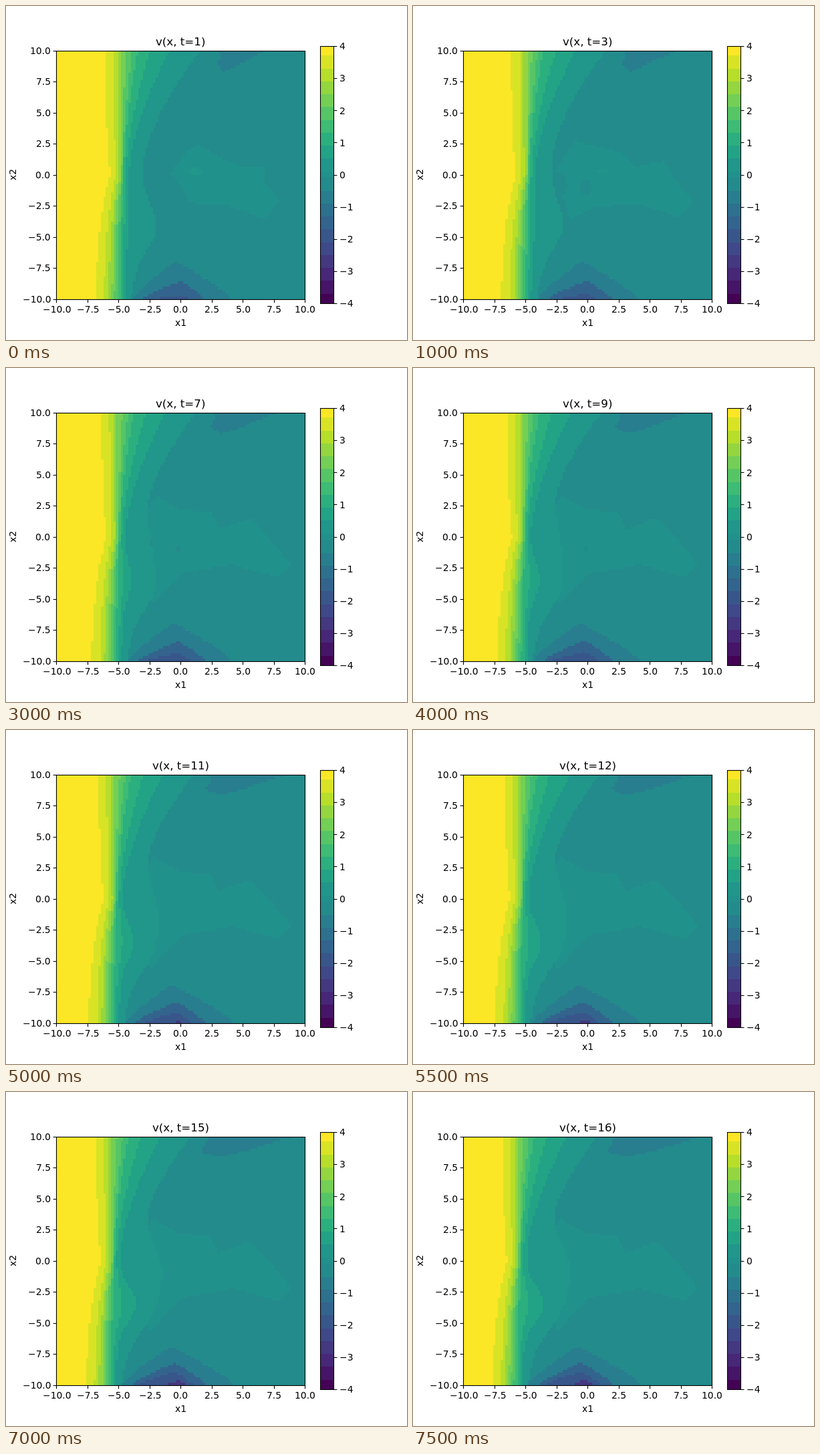
These frames come from a looping animation (600 by 500 pixels, 8 s). An HTML page with a canvas:

```html
<!DOCTYPE html>
<html lang="en">
<head>
<meta charset="utf-8">
<title>v(x, t)</title>
<style>
html, body { margin: 0; width: 100%; height: 100%; overflow: hidden; background: #fff; }
canvas { display: block; }
</style>
</head>
<body>
<canvas id="c" width="600" height="500"></canvas>
<script>
const ctx = document.getElementById('c').getContext('2d');
const LOOP = 8000, STEP = 500, STEPS = 16;
const L = 75, T = 66.5, SIZE = 372, N = 100, CELL = SIZE / N;
const BAR_Y = 60, BAR_H = 385;
const FONT = '"DejaVu Sans", Verdana, sans-serif';

const lerp = (a, b, k) => a + (b - a) * k;
const mix = (a, b, k) => a.map((v, i) => lerp(v, b[i], k));
const bump = (u, c, w) => Math.exp(-(((u - c) / w) ** 2));

const VIRIDIS = ['440154', '482475', '414487', '355f8d', '2a788e', '21918c',
  '22a884', '44bf70', '7ad151', 'bddf26', 'fde725']
  .map(h => [0, 2, 4].map(i => parseInt(h.slice(i, i + 2), 16)));

function viridis(p) {
  const s = Math.max(0, Math.min(.9999, p)) * 10, i = Math.floor(s);
  return `rgb(${mix(VIRIDIS[i], VIRIDIS[i + 1], s - i).map(Math.round)})`;
}

// bands are 0.4 wide, with a narrow one around zero
const bandOf = v => Math.sign(v) * Math.min(10, Math.floor((Math.abs(v) + .3) / .4));
const bandColor = n => viridis(.5 + Math.sign(n) * Math.max(0, .42 * Math.abs(n) - .23) / 8);
const colorOf = v => bandColor(bandOf(v));

// left slope at height u (-1 top, 1 bottom) and progress k: [x, value] knots
function slope(u, k) {
  const shift = -15 * k, up = u < 0 ? (-u) ** 1.6 : 0, down = Math.max(0, u);
  const full = shift + (u < 0 ? 148 + 8 * Math.exp(2.4 * u) : 131 + 25 * Math.exp(-u / .45));
  const steep = shift + 157 + 15 * Math.exp(-down / .4);
  return [
    [full, 3.7],
    [lerp(full, steep, .65), 3.2],
    [steep, 2.5],
    [shift + 177 + 24 * up - 5 * down, 1.1],
    [shift + 184 + 61 * up - 5 * down + 28 * k * bump(u, .35, .2), .5],
    [shift + 203 + 87 * up - 16 * down ** 2 + 25 * bump(u, .42, .24)
      + 45 * k * bump(u, .05, .3), .1]
  ];
}

function valueOn(knots, x) {
  if (x < knots[0][0]) return 4;
  for (let i = 1; i < knots.length; i++) {
    const [ax, av] = knots[i - 1], [bx, bv] = knots[i];
    if (x < bx) return lerp(av, bv, (x - ax) / (bx - ax));
  }
  return -.2;
}

// outlines as x, y key points: first and last shape
const PLATEAU = [
  [247,250, 270,216, 288,207, 322,228, 352,240, 387,240, 388,264, 410,292, 386,319, 330,297, 276,295, 260,268],
  [185,245, 220,190, 262,213, 305,214, 318,241, 365,224, 391,250, 427,293, 408,313, 340,294, 262,308, 215,360]
];
const CORNER = [
  [318,66, 321,78, 316,86, 325,100, 350,87, 388,66],
  [302,66, 297,80, 290,90, 318,97, 365,87, 434,66]
];

// nested hills on the lower edge: value, then [centre, left, right, height] at both ends
const HILLS = [
  [-.6, [254, 64, 82, 57], [246, 74, 96, 58]],
  [-1.4, [262, 59, 36, 27], [252, 65, 47, 34]],
  [-2, [262, 47, 15, 6], [253, 57, 27, 21]],
  [-2.8, [262, 14, 12, -9], [256, 16, 16, 9]]
];

function inside(p, x, y) {
  let hit = false;
  for (let i = 0, j = p.length - 2; i < p.length; j = i, i += 2)
    if (p[i + 1] > y !== p[j + 1] > y &&
      x < p[i] + (p[j] - p[i]) * (y - p[i + 1]) / (p[j + 1] - p[i + 1])) hit = !hit;
  return hit;
}

const inSpot = (x, y, cx, cy, rx, ry) => ((x - cx) / rx) ** 2 + ((y - cy) / ry) ** 2 < 1;

function underHill([c, left, right, height], x, y) {
  const d = 1 - Math.abs(x - c) / (x < c ? left : right);
  return d > 0 && height > 0 && 439 - y < height * d ** .8;
}

function drawField(step) {
  const k = (step - 1) / (STEPS - 1);
  const plateau = mix(...PLATEAU, 1 - Math.exp((1 - step) / 2.5));
  const corner = mix(...CORNER, k);
  const hills = HILLS.map(([v, a, b]) => [v, mix(a, b, k)]);
  const bright = 12 * Math.exp((1 - step) / 4) - 3;
  const hole = step < 2 ? 0 : 14 * Math.exp((3 - step) / 4);

  for (let j = 0; j < N; j++) {
    const y = T + (j + .5) * CELL;
    const knots = slope((y - 253) / 186, k), end = knots[knots.length - 1][0];
    const top = Math.round(T + j * CELL), bottom = Math.round(T + (j + 1) * CELL);
    for (let i = 0; i < N; i++) {
      const x = L + (i + .5) * CELL;
      let v = valueOn(knots, x);
      if (x >= end && inside(plateau, x, y)) {
        v = 0;
        if (bright > 0 && inSpot(x, y, 283, 247, bright + 2, bright / 2)) v = .2;
        if (hole > 2 && (inSpot(x, y, 216, 268, hole, hole * 1.4) ||
          inSpot(x, y, 258, 271, hole * .7, hole * .8))) v = -.2;
      }
      if (inside(corner, x, y)) v = -.6;
      for (const [hv, hill] of hills) if (underHill(hill, x, y)) v = hv;
      const left = Math.round(L + i * CELL);
      ctx.fillStyle = colorOf(v);
      ctx.fillRect(left, top, Math.round(L + (i + 1) * CELL) - left, bottom - top);
    }
  }
}

function line(x1, y1, x2, y2) {
  ctx.beginPath();
  ctx.moveTo(x1, y1);
  ctx.lineTo(x2, y2);
  ctx.stroke();
}

// align: 0 left, .5 centre, 1 right, measured on the ink and snapped to pixels
function text(s, x, y, align = .5, size = 13.89) {
  ctx.font = `${size}px ${FONT}`;
  const m = ctx.measureText(s);
  const ink = m.actualBoundingBoxLeft + m.actualBoundingBoxRight;
  ctx.fillText(s, Math.round(x - ink * align), Math.round(y));
}

const label = (v, d) => v.toFixed(d).replace('-', '\u2212');

function drawAxes(step) {
  ctx.fillStyle = ctx.strokeStyle = '#000';
  ctx.lineWidth = 1.1;
  ctx.strokeRect(75.5, 67.5, 372, 372);
  for (let i = 0; i <= 8; i++) {
    const s = label(-10 + i * 2.5, 1), x = L + i * SIZE / 8, y = T + SIZE - i * SIZE / 8;
    const px = Math.round(x) + .5, py = Math.round(y) + .5;
    line(px, 439.5, px, 444.4);
    line(70.6, py, 75.5, py);
    text(s, x, 459);
    text(s, 65.3, y + 5.3, 1);
  }
  text('x1', 261, 479);
  ctx.save();
  ctx.translate(15, 253);
  ctx.rotate(-Math.PI / 2);
  text('x2', 0, 0);
  ctx.restore();
  text(`v(x, t=${step})`, 261, 59, .5, 16.67);
}

function drawBar() {
  for (let y = BAR_Y; y < BAR_Y + BAR_H; y++) {
    ctx.fillStyle = colorOf(4 - (y + .5 - BAR_Y) / BAR_H * 8);
    ctx.fillRect(470, y, 20, 1);
  }
  ctx.fillStyle = ctx.strokeStyle = '#000';
  ctx.strokeRect(470.5, 60.5, 20, 385);
  for (let v = -4; v <= 4; v++) {
    const y = BAR_Y + (4 - v) / 8 * BAR_H, py = Math.round(y) + .5;
    line(490.5, py, 495.4, py);
    text(label(v, 0), 499.2, y + 5.3, 0);
  }
}

let shown = 0;
function tick(now) {
  const step = 1 + Math.floor(now % LOOP / STEP);
  if (step !== shown) {
    shown = step;
    ctx.fillStyle = '#fff';
    ctx.fillRect(0, 0, 600, 500);
    drawField(step);
    drawAxes(step);
    drawBar();
  }
  requestAnimationFrame(tick);
}
tick(0);
</script>
</body>
</html>
```
